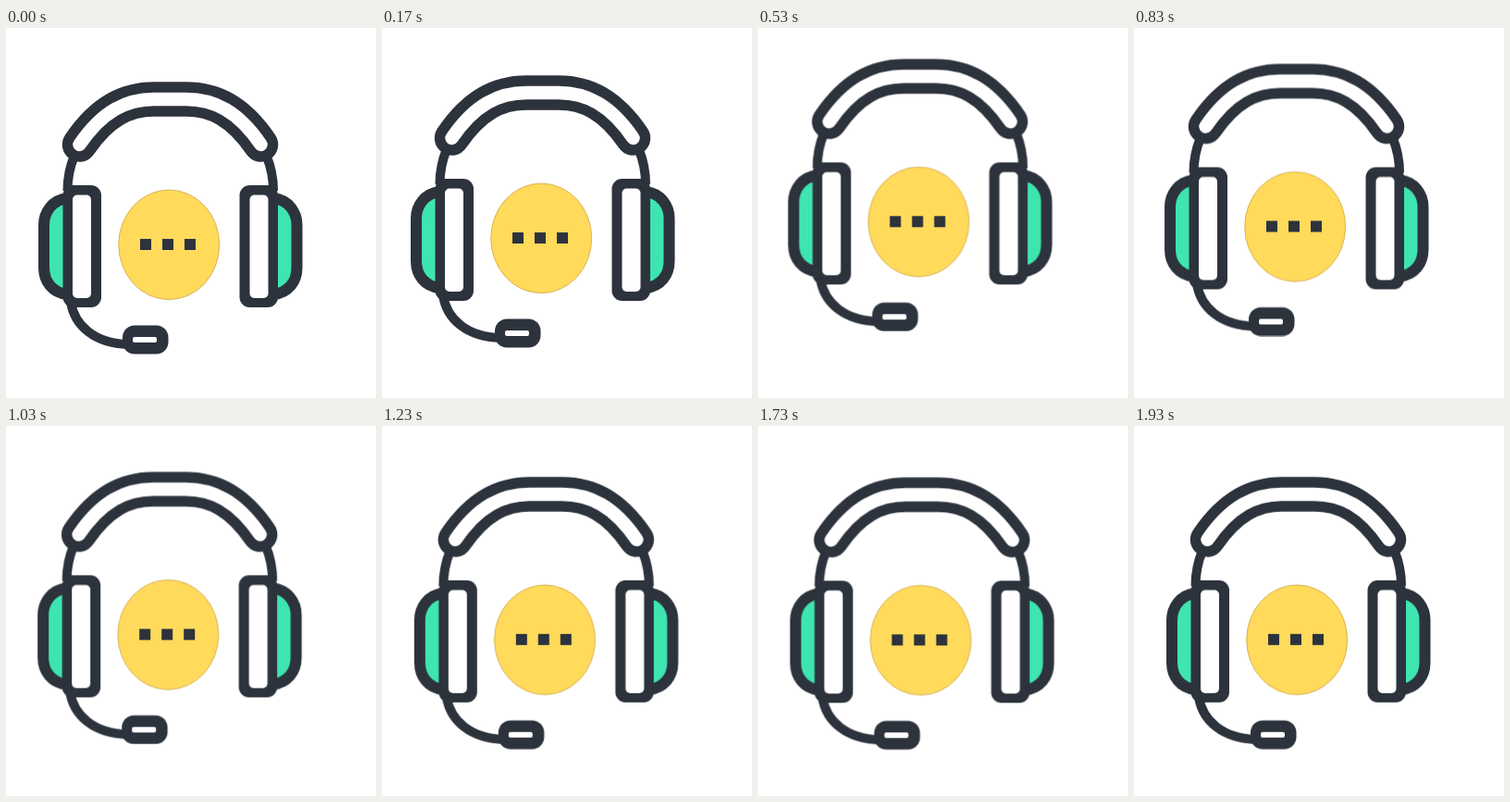
Animation of 400 by 400 pixels, one loop 1960 ms. Source, as an HTML page:

```html
<!DOCTYPE html>
<html lang="en">
<head>
<meta charset="utf-8">
<title>Headset</title>
<style>
  html, body { margin: 0; width: 100%; height: 100%; overflow: hidden; background: #fff; }
  svg { display: block; width: 100vw; height: 100vh; }
  .line { fill: none; stroke: #2d333d; }
  .dark { fill: #2d333d; }
  .white { fill: #fff; }
  .green { fill: #3ee5b0; }

  /* Drawn at 30 pictures a second: each stretch moves in whole steps. */
  #headset { animation: float 1960ms infinite; }
  @keyframes float {
    0%     { transform: translate(0, 0); animation-timing-function: steps(5); }
    8.67%  { transform: translate(-4px, -7px); animation-timing-function: steps(5); }
    16.83% { transform: translate(-3.5px, -17.7px); animation-timing-function: steps(3); }
    21.93% { transform: translate(-3px, -22.3px); animation-timing-function: steps(3); }
    27.04% { transform: translate(-2.5px, -24.7px); animation-timing-function: steps(1); }
    29.08% { transform: translate(-2.5px, -24.7px); animation-timing-function: steps(4); }
    35.71% { transform: translate(-2.3px, -23.2px); animation-timing-function: steps(4); }
    42.34% { transform: translate(-2px, -19.5px); animation-timing-function: steps(4); }
    49.48% { transform: translate(-1px, -10.5px); animation-timing-function: steps(3); }
    54.59% { transform: translate(-.5px, -5px); animation-timing-function: steps(5); }
    62.75% { transform: translate(-.2px, -3.2px); animation-timing-function: steps(9); }
    78.06% { transform: translate(-.8px, -2.2px); animation-timing-function: steps(12); }
    98.46%, 100% { transform: translate(0, -3.2px); }
  }
</style>
</head>
<body>
<svg viewBox="0 0 400 400">
  <defs>
    <path id="band" d="M79.5 126C104 90 130 77 160 77H195C225 77 251 90 275.5 126" fill="none" stroke-linecap="round"/>
    <g id="side">
      <path class="line" stroke-width="10" d="M74 138C69 150 66.5 160 66.5 176"/>
      <path class="green" d="M66 184C50 186 41 199 41 213V259C41 274 50 286 66 288Z"/>
      <path class="line" stroke-width="12" d="M66 184C50 186 41 199 41 213V259C41 274 50 286 66 288"/>
      <rect class="dark" x="61.5" y="170" width="41.5" height="132" rx="11"/>
      <rect class="white" x="72" y="180.5" width="20" height="111.5" rx="5"/>
    </g>
  </defs>
  <g id="headset">
    <path class="line" stroke-width="10" d="M70 296C74 322 96 341 132 342"/>
    <use href="#side"/>
    <use href="#side" transform="translate(355.5) scale(-1 1)"/>
    <use href="#band" stroke="#2d333d" stroke-width="37.5"/>
    <use href="#band" stroke="#fff" stroke-width="14.5"/>
    <rect class="dark" x="126" y="321.5" width="49.5" height="31" rx="13"/>
    <rect class="white" x="137" y="334" width="26" height="6" rx="2"/>
    <ellipse cx="176.2" cy="234.3" rx="54.5" ry="59.3" fill="#ffda5b" stroke="#cfa648" stroke-width=".8"/>
    <path class="dark" d="M145 228h12v12h-12zM169 228h12v12h-12zM193 228h12v12h-12z"/>
  </g>
</svg>
</body>
</html>
```
